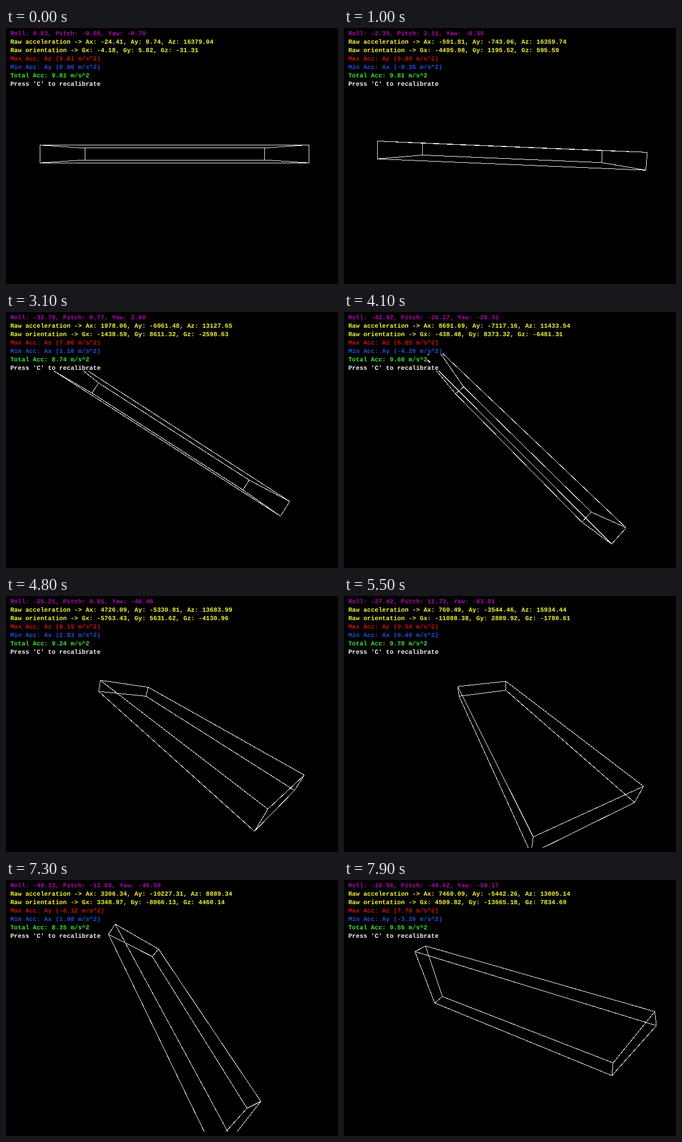
Animation of 590 by 456 pixels, one loop 8000 ms. Source, as an HTML page:

```html
<!DOCTYPE html>
<html lang="en">
<head>
<meta charset="utf-8">
<title>Motion sensor box</title>
<style>
  html, body { margin: 0; width: 100%; height: 100%; overflow: hidden; background: #000; }
  svg { display: block; }
  path { fill: none; stroke: #f0f0f0; stroke-width: 1; shape-rendering: crispEdges; }
  text { font: bold 11.15px "Liberation Mono", monospace; text-rendering: geometricPrecision; }
</style>
</head>
<body>
<svg width="590" height="456" viewBox="0 0 590 456">
  <clipPath id="view"><rect width="590" height="448.5"/></clipPath>
  <path id="box" clip-path="url(#view)"/>
  <g id="panel"></g>
</svg>
<script>
const STEP = 0.1, LOOP = 8;

// Moments of the movement: seconds, angles in degrees, raw sensor counts.
// The box lies still until the first one.
const MOMENTS = [
  { t: 0.7, angle: [0.03, -0.05, -0.70], acc: [-24.41, 0.74, 16379.04], gyro: [-4.18, 5.82, -31.31] },
  { t: 1.0, angle: [-2.39, 2.11, -0.35], acc: [-591.81, -743.06, 16359.74], gyro: [-4495.98, 1195.52, 595.59] },
  { t: 2.2, angle: [-19.34, 15.47, 6.44], acc: [-4064.21, -5111.36, 14652.34], gyro: [-2338.68, 8825.52, 895.79] },
  { t: 4.1, angle: [-42.92, -20.17, -20.31], acc: [8691.69, -7117.16, 11433.54], gyro: [-438.48, 8373.32, -6481.31] },
  { t: 5.5, angle: [-27.42, 11.73, -63.81], acc: [760.49, -3544.46, 15934.44], gyro: [-11088.38, 2889.92, -1780.61] },
  { t: 6.7, angle: [-76.37, 7.66, -63.20], acc: [-847.41, -15012.36, 4773.54], gyro: [2188.12, -2467.08, 1085.59] },
  { t: 7.9, angle: [-18.56, -49.62, -19.17], acc: [7460.09, -5442.26, 13005.14], gyro: [4509.82, -13665.18, 7834.69] }
];
const COUNTS_PER_G = 16384, GRAVITY = 9.81;
const TURN_RATE = 0.7 / 131; // gyro counts to degrees per second, damped

// The gyro readings give the slopes of the angle curves
function curve(from, to, gyro0, gyro1, span, u) {
  const m0 = gyro0 * TURN_RATE * span, m1 = gyro1 * TURN_RATE * span, d = to - from;
  return from + u * (m0 + u * (3 * d - 2 * m0 - m1 + u * (m0 + m1 - 2 * d)));
}

function readSensor(time) {
  const t = Math.max(time, MOMENTS[0].t);
  const next = MOMENTS.findIndex((m, i) => i && m.t >= t - 1e-6);
  const a = MOMENTS[next - 1], b = MOMENTS[next];
  const span = b.t - a.t, u = (t - a.t) / span;
  const mix = key => a[key].map((v, i) => v + (b[key][i] - v) * u);
  return {
    angle: a.angle.map((v, i) => curve(v, b.angle[i], a.gyro[i], b.gyro[i], span, u)),
    acc: mix('acc'),
    gyro: mix('gyro')
  };
}

function turn(a, b, deg) {
  const r = deg * Math.PI / 180, c = Math.cos(r), s = Math.sin(r);
  return [a * c - b * s, a * s + b * c];
}

// Half sizes 3 x 0.2 x 1, seen from 5 units away
function corner(n, [roll, pitch, yaw]) {
  let x = n & 1 ? 3 : -3, y = n & 2 ? 0.2 : -0.2, z = n & 4 ? 1 : -1;
  [y, z] = turn(y, z, pitch);
  [x, y] = turn(x, y, roll);
  [z, x] = turn(z, x, yaw);
  const scale = 319 / (5 - z);
  return [298.2 + x * scale, 224.4 - y * scale];
}

function boxPath(angle) {
  let d = '';
  for (let n = 0; n < 8; n++) {
    for (const bit of [1, 2, 4]) {
      if (!(n & bit)) d += `M${corner(n, angle)}L${corner(n | bit, angle)}`;
    }
  }
  return d;
}

const fix = v => v.toFixed(2);
const list = (names, values) => names.map((n, i) => `${n}: ${fix(values[i])}`).join(', ');

function report({ angle, acc, gyro }) {
  const axes = acc.map((v, i) => ({ name: 'A' + 'xyz'[i], v: v / COUNTS_PER_G * GRAVITY }));
  const total = Math.hypot(...axes.map(a => a.v));
  axes.sort((a, b) => Math.abs(a.v) - Math.abs(b.v));
  const label = a => `${a.name} (${fix(a.v)} m/s^2)`;
  return [
    list(['Roll', 'Pitch', 'Yaw'], angle),
    'Raw acceleration -> ' + list(['Ax', 'Ay', 'Az'], acc),
    'Raw orientation -> ' + list(['Gx', 'Gy', 'Gz'], gyro),
    'Max Acc: ' + label(axes[2]),
    'Min Acc: ' + label(axes[0]),
    `Total Acc: ${fix(total)} m/s^2`,
    "Press 'C' to recalibrate"
  ];
}

// Each line has its own black strip, hiding the box behind it
function addLine(color, row) {
  const make = (tag, attrs) => {
    const el = document.createElementNS('http://www.w3.org/2000/svg', tag);
    for (const key in attrs) el.setAttribute(key, attrs[key]);
    return document.getElementById('panel').appendChild(el);
  };
  const strip = make('rect', { x: 8, y: row * 15, height: 14.7 });
  const text = make('text', { x: 7.7, y: row * 15 + 12.5, fill: color });
  return content => {
    text.textContent = content;
    strip.setAttribute('width', content.length * 6.69);
  };
}

const box = document.getElementById('box');
const lines = ['#a80ca8', '#f4f43c', '#f4f43c', '#c81010', '#2050dc', '#38e438', '#f4f4f4'].map(addLine);

let shown = -1;
function draw(now) {
  const step = Math.floor(now / 1000 % LOOP / STEP);
  if (step !== shown) {
    shown = step;
    const state = readSensor(step * STEP);
    box.setAttribute('d', boxPath(state.angle));
    report(state).forEach((content, row) => lines[row](content));
  }
  requestAnimationFrame(draw);
}
draw(performance.now());
</script>
</body>
</html>
```
